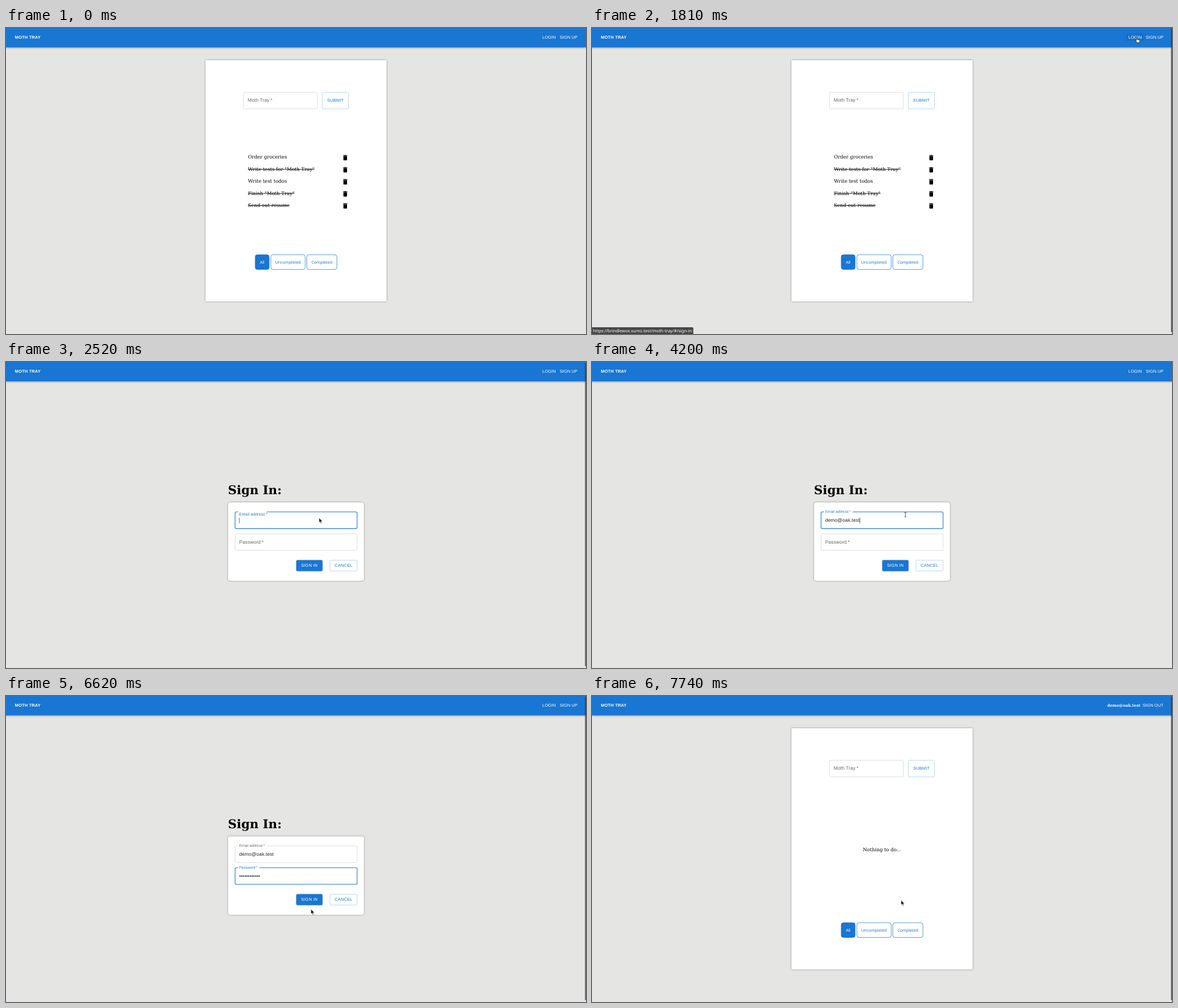
Recreate the animation shown at these times as an HTML page. Size 1029 by 544 pixels, loop 8000 ms.

```html
<!DOCTYPE html>
<html lang="en">
<head>
<meta charset="utf-8">
<title>Moth Tray</title>
<style>
  html, body { margin: 0; width: 1029px; height: 544px; overflow: hidden; background: #e5e5e3; }
  svg { display: block; text-rendering: geometricPrecision; }
  text { font: 8.575px "DejaVu Serif", serif; white-space: pre; }
  .sans { font: 8.575px "Liberation Sans", sans-serif; letter-spacing: .00938em; }
  .btn { font: 7.503px "Liberation Sans", sans-serif; letter-spacing: .02857em; }
  .nav { font: 7.503px "Liberation Sans", sans-serif; letter-spacing: .01em; fill: #fff; }
  .ui { font: 7.15px "Noto Sans", sans-serif; }
  .mid { text-anchor: middle; }
  .end { text-anchor: end; }
  .blue { fill: #1976d2; }
  .white { fill: #fff; }
  .label { fill: #666; }
  .value { fill: #212121; }
  .done { text-decoration: line-through; }
  .box { fill: none; stroke: #c4c4c4; stroke-width: .6; }
  .outline { fill: none; stroke: #8cbae8; stroke-width: .6; }
  .pill { fill: none; stroke: #1976d2; stroke-width: .75; }
  .card { fill: #fff; filter: drop-shadow(0 .5px 1.6px rgba(0,0,0,.42)); }
  .focus .box { stroke: #1976d2; stroke-width: 1.1; }
  .focus .label { fill: #1976d2; }
  #bar { filter: drop-shadow(0 1.2px 1.6px rgba(0,0,0,.38)); }
  #signBtn { filter: drop-shadow(0 .8px .8px rgba(0,0,0,.35)); }
</style>
</head>
<body>
<svg width="1029" height="544" viewBox="0 0 1029 544">
  <defs>
    <path id="bin" d="M6 19c0 1.1.9 2 2 2h8c1.1 0 2-.9 2-2V7H6zM19 4h-3.5l-1-1h-5l-1 1H5v2h14z" transform="scale(.536)"/>
  </defs>
  <rect width="1029" height="544" fill="#e5e5e3"/>

  <g id="home">
    <rect class="card" x="353.8" y="57.2" width="321.5" height="429"/>
    <rect class="box" x="421.3" y="114.3" width="131" height="29.6" rx="2.1"/>
    <text class="sans label" x="428.7" y="131">Moth Tray&#8201;*</text>
    <rect class="outline" x="561.2" y="114.3" width="46.3" height="29.6" rx="2.1"/>
    <text class="btn blue mid" x="584.5" y="130.8">SUBMIT</text>
    <g id="list"></g>
    <text id="note" class="mid" x="514.4" y="276"></text>
    <rect class="pill blue" style="fill:#1976d2" x="442.1" y="403" width="24.8" height="26.3" rx="4"/>
    <text class="ui white mid" x="454.5" y="418.6">All</text>
    <rect class="pill" x="469.9" y="403" width="61" height="26.3" rx="4"/>
    <text class="ui blue mid" x="500.3" y="418.6">Uncompleted</text>
    <rect class="pill" x="533.7" y="403" width="53.4" height="26.3" rx="4"/>
    <text class="ui blue mid" x="560.4" y="418.6">Completed</text>
  </g>

  <g id="sign">
    <text x="393.7" y="235" style="font-size:21.5px;font-weight:bold">Sign In:</text>
    <rect class="card" x="393.9" y="249.4" width="241.2" height="139.6" rx="4.2"/>
    <g id="email"></g>
    <g id="pass"></g>
    <rect id="signBtn" x="515" y="352.3" width="46.5" height="19.5" rx="2.1"/>
    <text class="btn white mid" x="538.3" y="364.4">SIGN IN</text>
    <rect class="outline" x="574.7" y="352.3" width="48.2" height="19.3" rx="2.1"/>
    <text class="btn blue mid" x="598.9" y="364.4">CANCEL</text>
  </g>

  <rect id="bar" width="1029" height="34.3" fill="#1976d2"/>
  <text class="btn white" x="15.7" y="19.4" style="font-weight:bold">MOTH TRAY</text>
  <g id="guest">
    <rect id="glow" x="948" y="9.5" width="31" height="14" rx="2" fill="#000" opacity=".06"/>
    <text class="nav" x="951.7" y="19">LOGIN</text>
    <text class="nav end" x="1013.9" y="19">SIGN UP</text>
  </g>
  <g id="user">
    <text class="white end" x="973" y="19" style="font-size:6.9px;font-weight:bold">demo@oak.test</text>
    <text class="nav end" x="1013.9" y="19">SIGN OUT</text>
  </g>

  <rect id="scroll" x="1027.2" y="1" width="1.8" height="540" rx=".9" fill="#333" opacity=".72"/>
  <g id="status">
    <path d="M0 532h177.5q2.2 0 2.2 2.2V544H0z" fill="#474747"/>
    <text class="white" x="1.8" y="541" style="font:7.55px 'Noto Sans',sans-serif">https://brindlewox.vumo.test/moth-tray/#/sign-in</text>
  </g>

  <g id="cursor">
    <path id="arrow" d="M0 0V8.6L2 6.8 3.4 9.9 4.9 9.2 3.5 6.3H6.2z" fill="#111" stroke="#fff" stroke-width=".6" stroke-linejoin="round"/>
    <path id="beam" d="M-1.7-4Q0-4 0-3Q0-4 1.7-4M0-3V3M-1.7 4Q0 4 0 3Q0 4 1.7 4" fill="none" stroke="#222" stroke-width=".8"/>
    <path id="hand" d="M0 .6Q.7-.3 1.4.6V4L5 4.7Q6 5 5.9 6L5.3 9.6H.9L-1.5 6.4Q-1.7 5.3-.7 5.5L0 6z" fill="#fff" stroke="#111" stroke-width=".7" stroke-linejoin="round"/>
  </g>
</svg>
<script>
const $ = id => document.getElementById(id);
const show = (id, on) => { $(id).style.display = on ? '' : 'none'; };
const clamp = v => Math.min(1, Math.max(0, v));
const mix = (a, b, p) => a + (b - a) * p;

// The screen refreshes in ticks of 80 ms; tick 0 is at 1000 ms.
const LOOP = 8000, TICK = 80, START = 1000;
const EMAIL = 'demo@oak.test';
const EMAIL_KEYS = [21, 23, 24, 26, 29, 31, 32, 34, 35, 37, 38, 39, 40];
const PASS_KEYS = [44, 46, 48, 49, 52, 53, 54, 56, 58, 59, 60, 62];
const PATH = [
  [0, 700, 330], [5, 868, 150], [9, 964, 18], [10, 966, 16.5], [12, 966, 16.5],
  [17, 555.3, 277], [22, 555.3, 277], [23, 556, 271.6], [66, 556, 271.6],
  [68, 546, 340], [70, 541, 379], [73, 548.3, 363]
];

$('list').innerHTML = [
  ['Order groceries'], ['Write tests for "Moth Tray"', 1], ['Write test todos'],
  ['Finish "Moth Tray"', 1], ['Send out resume', 1]
].map(([text, done], i) => {
  const y = 21.44 * i;
  return `<text class="${done ? 'done' : ''}" x="429.2" y="${232.2 + y}">${text}</text>
    <use href="#bin" x="595.4" y="${224.1 + y}"/>`;
}).join('');

function makeField(id, y, label, notch) {
  const g = $(id);
  g.innerHTML = `<rect class="box" x="406.4" y="${y}" width="216.5" height="29.6" rx="2.1"/>
    <rect class="notch white" x="411.6" y="${y - 1.2}" width="${notch}" height="2.4"/>
    <text class="sans label">${label}&#8201;*</text>
    <text class="sans value" x="413.7" y="${y + 17.5}"></text>
    <rect class="caret" y="${y + 10.3}" width=".7" height="10" fill="#222"/>`;
  const [gap, name, value, caret] =
    ['.notch', '.label', '.value', '.caret'].map(s => g.querySelector(s));
  return (focus, lift, text, blink) => {
    g.setAttribute('class', focus ? 'focus' : '');
    gap.style.display = lift > 0 ? '' : 'none';
    name.setAttribute('transform',
      `translate(413.7 ${y + mix(17.5, 1.6, lift)}) scale(${mix(1, .75, lift)})`);
    value.textContent = text;
    caret.style.display = focus && blink ? '' : 'none';
    if (focus) caret.setAttribute('x', 413.7 + (text ? value.getComputedTextLength() : 0));
  };
}
const email = makeField('email', 266.5, 'Email address', 51);
const pass = makeField('pass', 305.2, 'Password', 38);

// cubic-bezier(0, 0, .2, 1) over 200 ms
function lift(ticks) {
  const x = clamp(ticks * TICK / 200);
  let lo = 0, hi = 1;
  for (let i = 0; i < 20; i++) {
    const s = (lo + hi) / 2;
    if (.6 * s * s * (1 - s) + s ** 3 < x) lo = s; else hi = s;
  }
  return x === 1 ? 1 : 3 * lo * lo * (1 - lo) + lo ** 3;
}

function pointer(k) {
  const i = PATH.findIndex(p => p[0] > k);
  if (i < 0) return PATH[PATH.length - 1].slice(1);
  const a = PATH[Math.max(0, i - 1)], b = PATH[i];
  const u = clamp((k - a[0]) / (b[0] - a[0] || 1)), p = u * u * (3 - 2 * u);
  return [mix(a[1], b[1], p), mix(a[2], b[2], p)];
}

const typed = (keys, k) => keys.filter(n => n <= k).length;

function draw(k) {
  const onSign = k >= 12 && k < 77;
  show('sign', onSign);
  show('home', !onSign);
  show('list', k < 12 || k === 80 || k === 81);
  $('note').textContent = k >= 84 ? 'Nothing to do...' :
    k >= 77 && k !== 80 && k !== 81 ? 'Loading...' : '';
  show('guest', k < 82);
  show('user', k >= 82);
  show('scroll', k >= 0 && k < 36 || k >= 66);
  show('status', k >= 9 && k < 12);

  const inPass = k >= 42;
  email(k >= 19 && !inPass, lift(k - 18.2), EMAIL.slice(0, typed(EMAIL_KEYS, k)), true);
  pass(inPass, lift(k - 41.2), '•'.repeat(typed(PASS_KEYS, k)), k < 68);

  const [x, y] = pointer(k);
  const overLogin = k < 12 && x > 948 && y < 24;
  const overSign = k > 70 && k < 77 && y < 372;
  const kind = overLogin || overSign ? 'hand' : k >= 23 && k < 68 ? 'beam' : 'arrow';
  show('glow', overLogin);
  $('signBtn').setAttribute('fill', overSign ? '#1565c0' : '#1976d2');
  show('cursor', k >= 0);
  $('cursor').setAttribute('transform', `translate(${x} ${y})`);
  for (const id of ['arrow', 'beam', 'hand']) show(id, id === kind);
}

let last;
function frame() {
  const k = Math.floor((performance.now() % LOOP - START) / TICK);
  if (k !== last) draw(last = k);
  requestAnimationFrame(frame);
}
frame();
</script>
</body>
</html>
```
